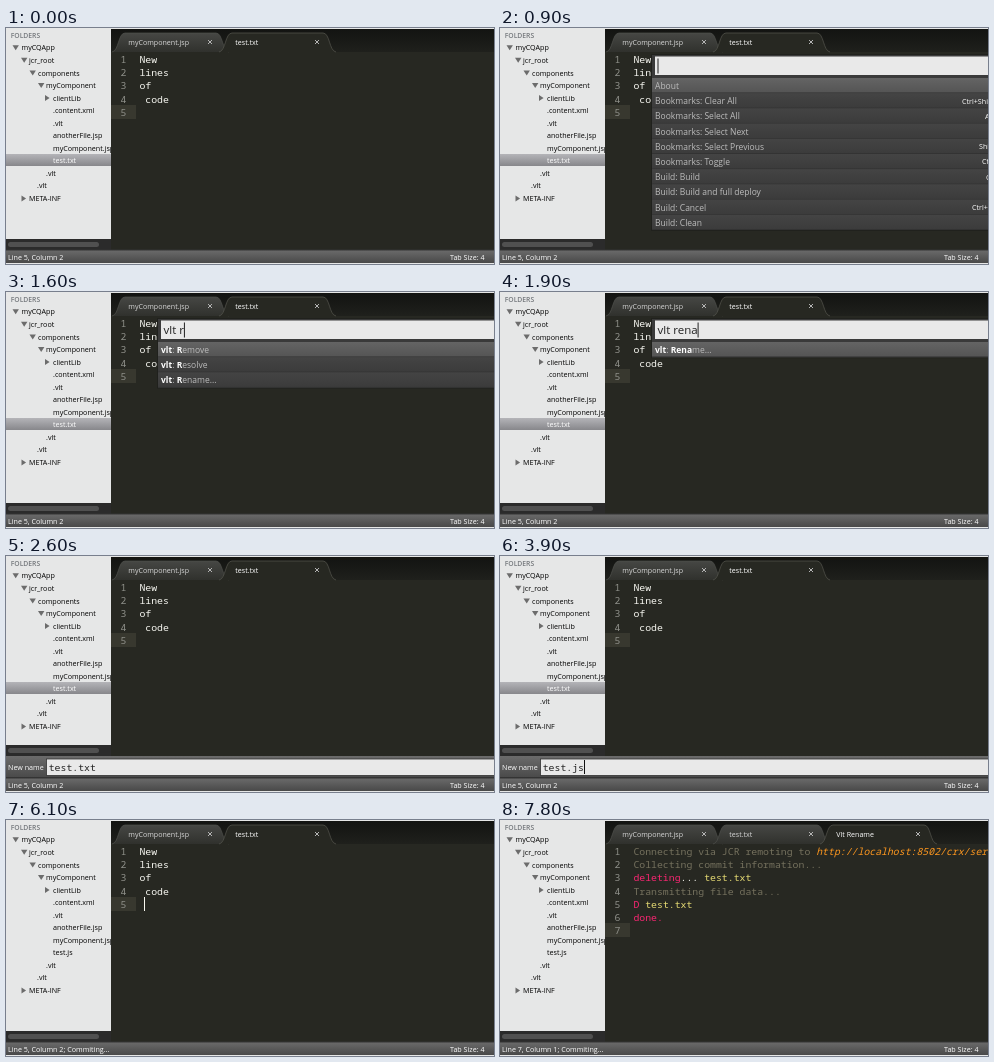
An HTML page for the animation above (7.9 s loop, 488 by 236 pixels).

```html
<!DOCTYPE html>
<html lang="en">
<head>
<meta charset="utf-8">
<title>Renaming a file in the editor</title>
<style>
  html, body { margin: 0; width: 100%; height: 100%; overflow: hidden; background: #272822; }
  svg { display: block; }
  text { white-space: pre; font: 500 7.15px "Open Sans", "Noto Sans", sans-serif; fill: #fff; }
  .mono { font: 9.83px "Noto Sans Mono", "DejaVu Sans Mono", monospace; fill: #f8f8f2; }
  .dark { fill: #000; }
  .head { font-size: 6.8px; font-weight: 600; fill: #74787c; }
  .num { fill: #8f908a; text-anchor: end; }
  .tab { font-size: 7.1px; fill: #d6d6d6; }
  .front { fill: #fff; }
  .item { font-size: 8.5px; font-weight: 400; fill: #bdbdbd; }
  .hit { font-weight: 700; fill: #fff; }
  .query { font-size: 11.5px; font-weight: 400; fill: #222; }
  .field { fill: #222; }
  .note { fill: #75715e; }
  .link { fill: #fd971f; font-style: italic; }
  .key { fill: #f92672; }
  .str { fill: #e6db74; }
</style>
</head>
<body>
<svg id="stage" width="488" height="236" xmlns="http://www.w3.org/2000/svg">
  <defs>
    <linearGradient id="bar" x2="0" y2="1"><stop stop-color="#6b6b6b"/><stop offset="1" stop-color="#494949"/></linearGradient>
    <linearGradient id="pick" x2="0" y2="1"><stop stop-color="#b4b4b8"/><stop offset="1" stop-color="#87878b"/></linearGradient>
    <linearGradient id="strip" x2="0" y2="1"><stop stop-color="#121311"/><stop offset="1" stop-color="#1f201c"/></linearGradient>
    <linearGradient id="idle" x2="0" y2="1"><stop stop-color="#464744"/><stop offset="1" stop-color="#30312d"/></linearGradient>
    <linearGradient id="row" x2="0" y2="1"><stop stop-color="#444"/><stop offset="1" stop-color="#3b3b3b"/></linearGradient>
    <linearGradient id="rowOn" x2="0" y2="1"><stop stop-color="#646464"/><stop offset="1" stop-color="#545454"/></linearGradient>
    <clipPath id="side"><rect width="105" height="236"/></clipPath>
  </defs>
</svg>
<script>
const LOOP = 7900;
const LINE = 13.2;
const CHAR = 5.9;
const ROW = 15.2;
const TAB = 107;
const SIDE = 105;
const stage = document.getElementById('stage');

const ABOUT = [
  ['About'], ['Bookmarks: Clear All', 462, 'Ctrl+Shift+F2'], ['Bookmarks: Select All', 485, 'Alt+F2'],
  ['Bookmarks: Select Next'], ['Bookmarks: Select Previous', 479, 'Shift+F2'],
  ['Bookmarks: Toggle', 482, 'Ctrl+F2'], ['Build: Build', 486, 'Ctrl+B'],
  ['Build: Build and full deploy'], ['Build: Cancel', 472, 'Ctrl+Break'], ['Build: Clean']
];
const vlt = names => names.map(name => ['vlt: ' + name]);
const VLT = vlt(['Add', 'Commit', 'Remove', 'Resolve', 'Status', 'Update',
  'Commit All', 'Update All', 'Add...', 'Rename...']);

// Each step changes part of the state from its time on.
const STEPS = [
  [0, { caret: 0, file: 'test.txt', picked: true, field: null, query: null, rows: ABOUT, on: 0,
        output: false, status: 'Line 5, Column 2' }],
  [200, { caret: 1 }], [600, { caret: .45 }], [700, { caret: 0 }],
  [900, { query: '' }],
  [1200, { query: 'v', rows: VLT, on: 2 }],
  [1300, { query: 'vl' }], [1400, { query: 'vlt' }], [1500, { query: 'vlt ' }],
  [1600, { query: 'vlt r', rows: vlt(['Remove', 'Resolve', 'Rename...']), on: 0 }],
  [1700, { query: 'vlt re', rows: vlt(['Remove', 'Rename...']) }],
  [1900, { query: 'vlt rena', rows: vlt(['Rename...']) }],
  [2100, { query: null, field: 'test.txt', caret: 1 }],
  [2500, { caret: .45 }], [2600, { caret: 0 }],
  [2800, { field: 'test.tx', caret: 1 }], [2900, { field: 'test.t' }],
  [3300, { field: 'test.' }], [3500, { field: 'test.j' }], [3700, { field: 'test.js' }],
  [5500, { field: null, caret: 0 }],
  [5700, { status: 'Line 5, Column 2; Commiting...' }],
  [5800, { file: 'test.js', picked: false }],
  [5900, { caret: 1 }], [6300, { caret: .45 }], [6400, { caret: 0 }],
  [6900, { output: true, caret: 1, status: 'Line 7, Column 1; Commiting...' }],
  [7300, { caret: .45 }], [7400, { caret: 0 }]
];

const CODE = [['New'], ['lines'], ['of'], [' code'], []];
const OUTPUT = [
  [['note', 'Connecting via JCR remoting to '], ['link', 'http://localhost:8502/crx/server']],
  [['note', 'Collecting commit information...']],
  [['key', 'deleting'], '... ', ['str', 'test.txt']],
  [['note', 'Transmitting file data...']],
  [['key', 'D'], ' ', ['str', 'test.txt']],
  [['key', 'done.']],
  []
];

function add(parent, tag, attrs) {
  const node = document.createElementNS(stage.namespaceURI, tag);
  for (const name in attrs) node.setAttribute(name, attrs[name]);
  return parent.appendChild(node);
}
const box = (g, x, y, width, height, fill, more) =>
  add(g, 'rect', { x, y, width, height, fill, ...more });
const path = (g, d, fill, more) => add(g, 'path', { d, fill, ...more });

// A run is a plain string or a [class, string] pair.
function write(g, x, y, runs, cls = '') {
  const text = add(g, 'text', { x, y, class: cls });
  for (const run of typeof runs === 'string' ? [runs] : runs) {
    if (typeof run === 'string') text.append(run);
    else add(text, 'tspan', { class: run[0] }).textContent = run[1];
  }
  return text;
}

function arrow(g, x, y, open) {
  path(g, open ? `M${x} ${y - 2.5}h6.4l-3.2 5z` : `M${x + .5} ${y - 3}v6l4.6-3z`, '#6c6c6c');
}

function drawSidebar(g, s) {
  const side = add(g, 'g', { 'clip-path': 'url(#side)' });
  box(side, 0, 0, SIDE, 222, '#e6e7e7');
  write(side, 4.7, 9.7, 'FOLDERS', 'head');
  const tree = [
    [15.5, 'myCQApp', 6.5, 1], [23, 'jcr_root', 15, 1], [32, 'components', 23.5, 1],
    [40, 'myComponent', 32, 1], [47, 'clientLib', 38.5, 0], [47, '.content.xml'], [47, '.vlt'],
    [47, 'anotherFile.jsp'], [47, 'myComponent.jsp'], [47, s.file],
    [40, '.vlt'], [31, '.vlt'], [23, 'META-INF', 15, 0]
  ];
  tree.forEach(([x, name, tip, open], i) => {
    const y = 19.8 + i * 12.55;
    const lit = s.picked && i === 9;
    if (lit) box(side, 0, 126, SIDE, 12, 'url(#pick)');
    if (tip !== undefined) arrow(side, tip, y, open);
    write(side, x, y + 2.6, name, lit ? '' : 'dark');
  });
  const top = s.field === null ? 211 : 189;
  box(side, 0, top, SIDE, 11, '#2b2b2b');
  box(side, 2, top + 3, 91, 5, '#505050', { rx: 2.5 });
}

function drawTab(g, x, name, active) {
  path(g, `M${x} 24C${x + 7} 23 ${x + 6} 5 ${x + 13} 5H${x + 104}C${x + 111} 5 ${x + 110} 23 ${x + 117} 24`,
    active ? '#272822' : 'url(#idle)', { stroke: active ? '#565750' : '#50514c', 'stroke-width': .7 });
  write(g, x + 16.3, 16.6, name, active ? 'tab front' : 'tab');
  path(g, `M${x + 96} 12l4 4m0-4l-4 4`, 'none', { stroke: '#b5b5b5', 'stroke-width': 1 });
}

function drawEditor(g, s) {
  box(g, 104, 0, 384, 222, '#272822');
  box(g, 104, 0, 384, 24, 'url(#strip)');
  const tabs = ['myComponent.jsp', 'test.txt'].concat(s.output ? ['Vlt Rename'] : []);
  const last = tabs.length - 1;
  tabs.forEach((name, i) => drawTab(g, 106 + i * TAB, name, i === last));

  const lines = s.output ? OUTPUT : CODE;
  const caretY = s.output ? 103 : 77;
  box(g, SIDE, caretY, 25, 14, '#38382f');
  lines.forEach((runs, i) => {
    const y = 35 + i * LINE;
    write(g, 120.5, y, String(i + 1), 'mono num');
    if (runs.length) write(g, 133.4, y, runs, 'mono');
  });
  if (s.field === null && s.query === null) {
    box(g, s.output ? 133 : 138, caretY, 1, 14, '#f8f8f0', { opacity: s.caret });
  }
}

function drawBars(g, s) {
  box(g, 0, 222, 488, 13, 'url(#bar)');
  box(g, 0, 221.5, 488, 1, '#343434');
  write(g, 2, 231.8, s.status);
  write(g, 444, 231.8, 'Tab Size: 4');
  if (s.field === null) return;
  box(g, 0, 200, 488, 22, 'url(#bar)');
  box(g, 0, 221, 488, 1, '#343434');
  write(g, 2, 213.8, 'New name');
  box(g, 40.5, 203, 448, 16.5, '#e9e9e9', { stroke: '#333', 'stroke-width': .8 });
  write(g, 42.7, 214.6, s.field, 'mono field');
  box(g, Math.floor(42.7 + s.field.length * CHAR), 204, 1, 14, '#111', { opacity: s.caret });
}

// Marks the letters of the query in order.
function mark(label, query) {
  const want = query.replace(/ /g, '').toLowerCase();
  let k = 0;
  return [...label].map(ch => k < want.length && ch.toLowerCase() === want[k] ? (k++, ['hit', ch]) : ch);
}

function drawPalette(g, s) {
  if (s.query === null) return;
  box(g, 151.5, 26.5, 340, 24 + s.rows.length * ROW, '#3a3a3a', { stroke: '#20211d', 'stroke-width': 1 });
  box(g, 155, 28.5, 340, 18.5, '#e9e9e9');
  const text = write(g, 157.5, 42, s.query, 'query');
  box(g, 157.5 + text.getComputedTextLength(), 30.5, 1, 15, '#222');
  s.rows.forEach(([label, x, keys], i) => {
    const y = 50 + i * ROW;
    box(g, 152, y, 336, ROW, i === s.on ? 'url(#rowOn)' : 'url(#row)');
    box(g, 152, y + ROW - .7, 336, .7, '#303030');
    write(g, 155, y + 10.9, mark(label, s.query), 'item');
    if (keys) write(g, x, y + 10.4, keys);
  });
}

function drawEdges(g) {
  for (const y of [0, 235]) box(g, 0, y, 488, 1, '#e6e7e7');
}

const layer = add(stage, 'g');
let shown = -1;

function render(t) {
  const count = STEPS.filter(([at]) => at <= t).length;
  if (count === shown) return;
  shown = count;
  const s = Object.assign({}, ...STEPS.slice(0, count).map(step => step[1]));
  layer.replaceChildren();
  for (const draw of [drawEditor, drawSidebar, drawBars, drawPalette, drawEdges]) draw(layer, s);
}

const start = performance.now();
function tick() {
  render((performance.now() - start) % LOOP);
  requestAnimationFrame(tick);
}
tick();
</script>
</body>
</html>
```
